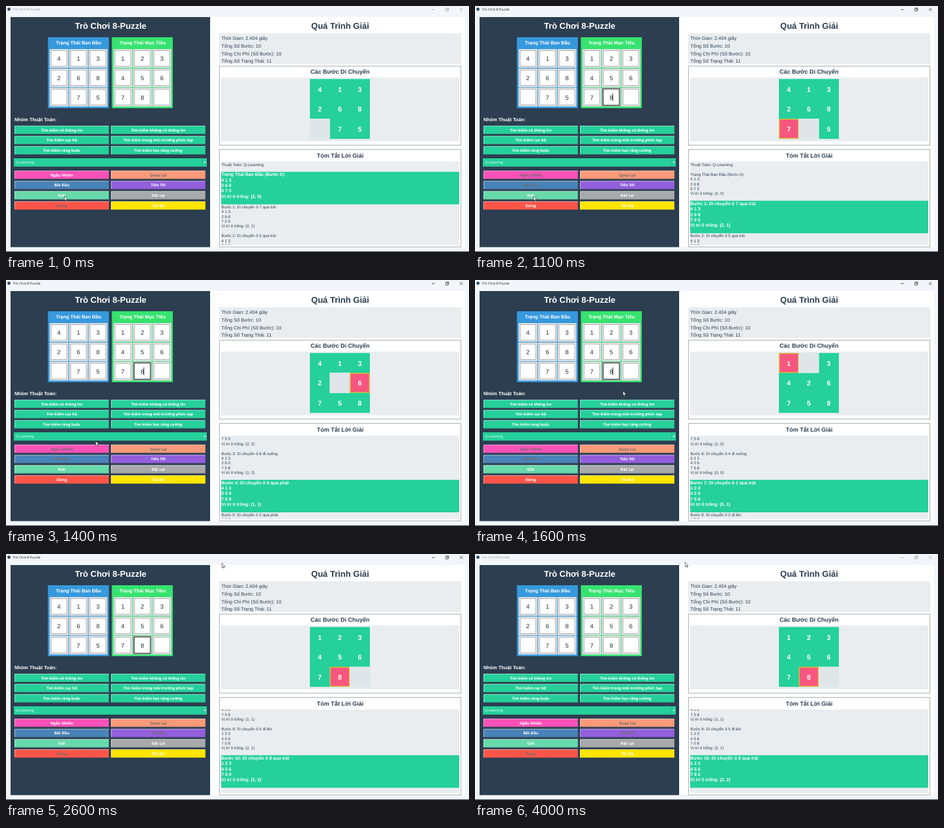
An HTML page that plays this animation: 710x378 px, repeating every 4.1 s.

```html
<!DOCTYPE html>
<html lang="vi">
<head>
<meta charset="utf-8">
<title>Trò Chơi 8-Puzzle</title>
<style>
  html, body { margin: 0; width: 100%; height: 100%; overflow: hidden; background: #f2f5f9; }
  svg { display: block; width: 710px; height: 378px; text-rendering: geometricPrecision; }
  text { font-family: "Liberation Sans", Arial, sans-serif; }
  .ui { font-family: "Open Sans", "Noto Sans", sans-serif; }
  .b { font-weight: bold; }
  .m { text-anchor: middle; }
</style>
</head>
<body>
<svg viewBox="0 0 710 378">
  <defs><clipPath id="view"><rect x="330" y="239" width="365" height="128"/></clipPath></defs>
  <g id="base"></g>
  <g id="live"></g>
</svg>
<script>
const LOOP = 4100, TICK = 100;
const INK = '#2c3e50', TEAL = '#25d09b', PALE = '#e9edf0', OFF = '#6d6d6d';
const ROW = 7.4, BLOCK = 50;

const rect = (x, y, w, h, fill, extra = '') =>
  `<rect x="${x}" y="${y}" width="${w}" height="${h}" fill="${fill}" ${extra}/>`;
// y is the middle of the capitals
const text = (s, x, y, size, fill, cls = '') =>
  `<text x="${x}" y="${y + size * 0.36}" font-size="${size}" fill="${fill}" class="${cls}">${s}</text>`;
const path = (d, stroke, w = 0.7) => `<path d="${d}" fill="none" stroke="${stroke}" stroke-width="${w}"/>`;

// Puzzle states, derived from the tiles moved in turn
const states = [{ title: 'Trạng Thái Ban Đầu (Bước 0):', grid: [4, 1, 3, 2, 6, 8, 0, 7, 5] }];
const WAYS = { '1': 'qua phải', '-1': 'qua trái', '3': 'đi xuống', '-3': 'đi lên' };
[7, 5, 8, 6, 2, 4, 1, 2, 5, 8].forEach((tile, i) => {
  const grid = states[i].grid.slice();
  const from = grid.indexOf(tile), to = grid.indexOf(0);
  grid[to] = tile;
  grid[from] = 0;
  states.push({ title: `Bước ${i + 1}: Di chuyển ô ${tile} ${WAYS[to - from]}`, grid, moved: to });
});

function linesOf({ title, grid }) {
  const gap = grid.indexOf(0);
  const rows = [0, 3, 6].map(r => grid.slice(r, r + 3).join(' '));
  return [title, ...rows, `Vị trí ô trống: (${Math.floor(gap / 3)}, ${gap % 3})`, ''];
}

function button(label, col, row, y, fill, color = '#fff') {
  const x = col ? 161 : 13;
  return rect(x, y, 145, 12.8, fill) +
    path(`M${x + 0.4} ${y + 12.4}V${y + 0.4}H${x + 144.6}`, 'rgba(255,255,255,.6)', 0.8) +
    path(`M${x + 0.4} ${y + 12.5}H${x + 144.6}V${y + 0.4}`, 'rgba(60,70,80,.4)', 0.7) +
    text(label, x + 72.5, y + 6.5, 5.85, color, 'ui b m');
}

function entryGrid(x, title, fill, grid) {
  let out = rect(x, 48, 93.5, 109, fill) + text(title, x + 47, 56, 7.4, '#fff', 'b m');
  grid.forEach((n, i) => {
    const cx = x + 2.6 + i % 3 * 29.9, cy = 66.3 + Math.floor(i / 3) * 29.7;
    out += rect(cx, cy, 28.6, 28.6, '#fff') +
      rect(cx + 0.3, cy + 0.3, 28, 28, 'none', 'stroke="#a7b0b5" stroke-width=".5"') +
      rect(cx + 2.2, cy + 2.2, 24.2, 24.2, 'none', 'stroke="#85898d" stroke-width=".8"');
    if (n) out += text(n, cx + 14.3, cy + 14.5, 9.3, '#222d38', 'm');
  });
  return out;
}

function drawBase() {
  const border = 'stroke="#95999d" stroke-width=".8"';
  let out = rect(0, 0, 710, 378, '#f2f5f9') + rect(313, 17, 391, 353.5, '#fff') +
    rect(7, 17, 306, 353.5, INK) + rect(0, 377, 710, 1, '#35455a') +
    '<circle cx="4.5" cy="5" r="2.4" fill="#27496d"/>' +
    text('Trò Chơi 8-Puzzle', 160.5, 30.5, 13, '#fff', 'b m') +
    entryGrid(64.3, 'Trạng Thái Ban Đầu', '#3699dc', states[0].grid) +
    entryGrid(162.3, 'Trạng Thái Mục Tiêu', '#36e36f', states[10].grid) +
    text('Nhóm Thuật Toán:', 13, 174, 7.4, '#fff', 'b');

  ['có thông tin', 'không có thông tin', 'cục bộ', 'trong môi trường phức tạp', 'ràng buộc', 'học tăng cường']
    .forEach((s, i) => {
      out += button('Tìm kiếm ' + s, i % 2, 0, 184 + Math.floor(i / 2) * 15.7, TEAL);
    });

  out += rect(12, 234, 296, 12.8, TEAL) + path('M301.5 234V246.8', '#4b9f86', 0.6) +
    '<path d="M303 239.4h3.6l-1.8 2.2z" fill="#fff"/>' +
    text('Q-Learning', 15, 240.5, 5.4, '#fff', 'ui');

  out += text('Quá Trình Giải', 512.5, 30.5, 13, INK, 'b m') + rect(327, 42, 371, 47, PALE);
  ['Thời Gian: 2.404 giây', 'Tổng Số Bước: 10', 'Tổng Chi Phí (Số Bước): 10', 'Tổng Số Trạng Thái: 11']
    .forEach((s, i) => { out += text(s, 330.3, [49.3, 61.8, 73, 84][i], 7.4, INK); });

  out += rect(327.3, 92.3, 370.4, 121.6, '#fff', border) + rect(330, 110, 365, 98, PALE) +
    text('Các Bước Di Chuyển', 512.3, 100.5, 9, INK, 'b m') +
    rect(327.3, 220.3, 370.4, 149.8, '#fff', border) + rect(330, 239, 365, 128, PALE) +
    text('Tóm Tắt Lời Giải', 512.5, 229.3, 9, INK, 'b m');
  return out;
}

function board({ grid, moved }) {
  const size = 30.6;
  let out = rect(466, 112.2, 92, 92, TEAL);
  grid.forEach((n, i) => {
    const x = 466 + i % 3 * size, y = 112.2 + Math.floor(i / 3) * size;
    if (!n) out += rect(x, y, size, size, '#dfe5e8', 'stroke="#eef1f2" stroke-width=".6"');
    if (i === moved) out += rect(x + 0.7, y + 0.7, size - 1.4, size - 1.4, '#f7567f', 'stroke="#efb52f" stroke-width="1.4"');
    if (n) out += text(n, x + size / 2, y + 15.6, 10.6, '#fff', 'b m');
  });
  return out;
}

function log(step) {
  const start = 240 + (2 + step * 6) * ROW;
  const scroll = step < 3 ? 0 : start - (step === 10 ? 309.2 : 307);
  let y = 240 - scroll;
  let out = text('Thuật Toán: Q-Learning', 330.3, y + ROW / 2, 6.15, INK);
  y += 2 * ROW;
  states.forEach((state, i) => {
    const on = i === step, pitch = on ? BLOCK / 6 : ROW;
    if (on) out += rect(330, y, 365, BLOCK, TEAL);
    for (const s of linesOf(state)) {
      out += text(s, 330.3, y + pitch / 2, on ? 6.9 : 6.15, on ? '#fff' : INK, on ? 'b' : '');
      y += pitch;
    }
  });
  return `<g clip-path="url(#view)">${out}</g>`;
}

function controls(t) {
  const running = t >= 1100 && t < 1900, done = t >= 1900;
  const pressed = t >= 300 && t < 1100;
  const idle = off => off ? OFF : '#fff';
  return [
    ['Ngẫu Nhiên', '#fa52b8', idle(running)], ['Quay Lại', '#fb9a79', OFF],
    ['Bắt Đầu', '#4983b8', idle(running)], ['Tiến Tới', '#935fdc', idle(done)],
    ['Giải', pressed ? '#f1f1f1' : '#67d9aa', pressed ? '#111' : '#fff'], ['Đặt Lại', '#a8a9aa', '#fff'],
    ['Dừng', '#fd5549', idle(!running)], ['Tốc Độ', '#ffe500', '#fff'],
  ].map(([s, fill, color], i) => button(s, i % 2, 0, 253 + Math.floor(i / 2) * 15.75, fill, color)).join('');
}

function chrome(active) {
  const c = active ? '#20242a' : '#9a9ea4';
  return text('Trò Chơi 8-Puzzle', 10.5, 5.4, 5.3, c, 'ui') +
    path('M653 5.6h4.6M674.2 4.2h3.4v3.6h-3.4zM675.4 4.2v-1.2h3.4v3.6h-1.2M696 3.2l4.4 4.4M700.4 3.2l-4.4 4.4', c);
}

function focusRing(t) {
  const caret = t < 1700 ? path('M211.3 134.3V146', '#111', 0.9) : '';
  return rect(196.2, 127.2, 25.4, 25.6, 'none', 'stroke="#5d6063" stroke-width="1.7"') + caret;
}

const STEPS = [[1100, 1], [1200, 2], [1300, 3], [1400, 4], [1500, 6], [1600, 7], [1700, 9], [1800, 10]];
const POINTER = [
  [0, 89.7, 292], [1200, 89.7, 292], [1400, 137.5, 247.5], [1800, 316.5, 93.5],
  [2200, 319, 30], [2600, 331, 13.8], [3000, 331, 13.8], [3200, 322.3, 12.6], [LOOP, 322.3, 12.6],
];

function pointer(t) {
  const i = POINTER.findIndex(p => p[0] > t);
  const [t0, x0, y0] = POINTER[i - 1], [t1, x1, y1] = POINTER[i];
  const k = (t - t0) / (t1 - t0);
  return `<path transform="translate(${x0 + (x1 - x0) * k} ${y0 + (y1 - y0) * k})"
    d="M0 0V7L1.6 5.6 2.7 8 3.8 7.5 2.7 5.2H4.8Z" fill="#fff" stroke="#222" stroke-width=".6"/>`;
}

const live = document.getElementById('live');
document.getElementById('base').innerHTML = drawBase();

let last = -1;
function frame() {
  const t = Math.floor(performance.now() % LOOP / TICK) * TICK;
  if (t !== last) {
    last = t;
    const step = STEPS.reduce((s, [at, n]) => t >= at ? n : s, 0);
    const active = t >= 300 && t < 3900;
    live.innerHTML = chrome(active) + (active ? focusRing(t) : '') + controls(t) +
      board(states[step]) + log(step) + pointer(t);
  }
  requestAnimationFrame(frame);
}
frame();
</script>
</body>
</html>
```
